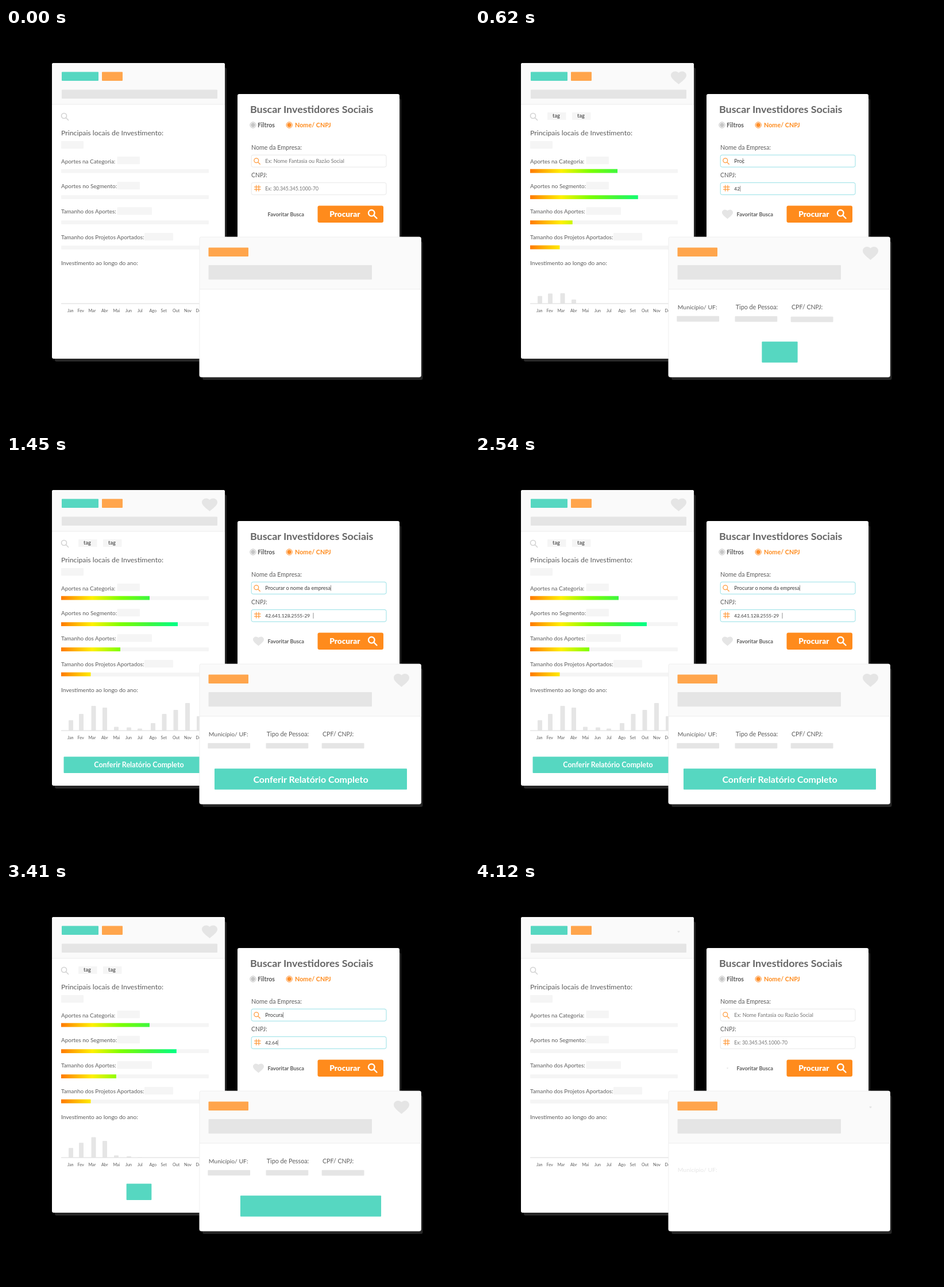
Write an HTML page that moves like this. It is 806 px wide and 695 px high and loops after 4160 ms.

```html
<!DOCTYPE html>
<html lang="pt">
<head>
<meta charset="utf-8">
<title>Busca</title>
<style>
html, body { margin: 0; width: 100%; height: 100%; overflow: hidden; background: #000; }
svg { display: block; width: 806px; height: 695px; }
text { font-family: Lato, "Open Sans", sans-serif; fill: #5c5c5c; white-space: pre; }
</style>
</head>
<body>
<svg id="stage" viewBox="0 0 806 695" xmlns="http://www.w3.org/2000/svg"></svg>
<script>
const LOOP = 4160;
const TEAL = '#56d7c1', ORANGE = '#ffa54c', DEEP = '#ff8b1c', GRAY = '#e5e5e5', PALE = '#f5f5f5';
const NAME = 'Procurar o nome da empresa', CODE = '42.641.128.2555-29';

// Markup helpers
const rect = (x, y, w, h, fill, extra = '') =>
  `<rect x="${x}" y="${y}" width="${w}" height="${h}" fill="${fill}" ${extra}/>`;
const text = (x, y, size, str, extra = '') =>
  `<text x="${x}" y="${y}" font-size="${size}" ${extra}>${str}</text>`;
const bold = (x, y, size, str, extra = '') => text(x, y, size, str, 'font-weight="700" ' + extra);
const group = (id, body) => `<g id="${id}">${body}</g>`;
const lens = (x, y, r, tail, color, w) =>
  `<g fill="none" stroke="${color}" stroke-width="${w}" stroke-linecap="round"><circle cx="${x}" cy="${y}" r="${r}"/>` +
  `<path d="M${x + r * .72} ${y + r * .72}l${tail} ${tail}"/></g>`;
const radio = (x, color) =>
  `<circle cx="${x}" cy="169" r="5.2" fill="none" stroke="${color}"/><circle cx="${x}" cy="169" r="3.7" fill="${color}"/>`;
const card = (x, y, w, h) =>
  rect(x + 5, y + 8, w - 2, h - 3, '#262626', 'rx="3"') + rect(x, y, w, h, '#fff', 'rx="3"');
const header = (x, y, w, h) =>
  `<path d="M${x} ${y + h}v${3 - h}q0-3 3-3h${w - 6}q3 0 3 3v${h - 3}z" fill="#fafafa"/>` +
  rect(x, y + h - .5, w, 1, '#eee');

const hearts = [[354.5, 86.7, 27, 22.5], [688.5, 392.5, 27, 23], [439.5, 324.5, 19, 16]];
const heart = (h, i) => `<path id="heart${i}" fill="${GRAY}" d="M0 9.175l-1.45-1.32C-6.6 3.185-10 .105-10-3.675` +
  `-10-6.755-7.58-9.175-4.5-9.175c1.74 0 3.41.81 4.5 2.09C1.09-8.365 2.76-9.175 4.5-9.175 7.58-9.175 10-6.755 10-3.675` +
  `c0 3.78-3.4 6.86-8.55 11.54z"/>`;

// Meters: y, fill width, start time
const meters = [[245.7, 154, 231], [291.3, 203, 350], [335.2, 103, 472], [378.6, 51.5, 112]];
const months = ['Jan', 'Fev', 'Mar', 'Abr', 'Mai', 'Jun', 'Jul', 'Ago', 'Set', 'Out', 'Nov', 'Dez'];
const monthX = [107, 124.5, 143.5, 166, 186.5, 208, 229, 249.5, 269.5, 290, 310, 330.5];
const barX = [113, 131, 152.5, 172, 192, 214, 233, 256, 275.5, 295.5, 316, 336];
const barH = [18, 29, 43, 40, 6.5, 5.5, 3.5, 13, 29, 36, 48, 25];

const report = card(80, 61, 301, 515) + header(80, 61, 301, 72) +
  rect(97, 76.5, 64, 15.5, TEAL, 'rx="1"') + rect(167, 76.5, 36, 15.5, ORANGE, 'rx="1"') +
  rect(97, 107.5, 271, 15.5, GRAY, 'rx="1"') + heart(0, 0) +
  lens(101, 153, 4.5, 4.3, '#d2d2d2', 1.6) +
  [126, 169].map((x, i) => group('tag' + i,
    rect(x, 147, 32.5, 13, PALE, 'rx="1"') + bold(x + 9, 156, 9.1, 'tag'))).join('') +
  text(96, 187, 12.3, 'Principais locais de Investimento:') +
  text(96, 235.5, 9.92, 'Aportes na Categoria:') +
  text(96, 278.5, 9.95, 'Aportes no Segmento:') +
  text(96, 322.5, 9.82, 'Tamanho dos Aportes:') +
  text(96, 367.5, 9.82, 'Tamanho dos Projetos Aportados:') +
  text(96, 413, 10.1, 'Investimento ao longo do ano:') +
  [[96, 197, 39], [193.5, 224, 39.5], [193.5, 268, 39.5], [193.5, 312.3, 60.5], [241, 357, 50]]
    .map(([x, y, w]) => rect(x, y, w, 13.3, PALE, 'rx="1"')).join('') +
  meters.map(([y], i) => rect(96, i === 3 ? 379 : y, 257, 6.8, PALE, 'rx="1"') +
    rect(96, y, 0, 6.8, 'url(#heat)', `id="meter${i}"`)).join('') +
  barX.map((x, i) => rect(x - 4, 480, 8, 0, GRAY, `id="bar${i}" rx="1"`)).join('') +
  rect(96, 479.4, 257, 1.3, '#e2e2e2') +
  months.map((m, i) => text(monthX[i], 495, 7.2, m)).join('') +
  rect(231.5, 525.5, 0, 28.5, TEAL, 'id="btn0" rx="1"') +
  bold(231.5, 544, 12.5, 'Conferir Relatório Completo', 'id="label0" text-anchor="middle" style="fill:#fff"');

const field = (i, y, hint, size) =>
  rect(427.2, y, 234.8, 21, '#fff', `id="field${i}" rx="3" stroke="#e8e8e8"`) +
  text(451.3, y + 14, size, hint, `id="hint${i}" style="fill:#757575"`) +
  text(451.3, y + 14, i ? 8.48 : 9.05, '', `id="typed${i}" style="fill:#3c3c3c"`) +
  rect(451, y + 5.5, .8, 10, '#777', `id="caret${i}"`);

const search = card(403, 115, 282, 300) +
  bold(425, 147.5, 17.9, 'Buscar Investidores Sociais', 'style="fill:#666"') +
  radio(430, '#c6c6c6') + bold(438, 172.8, 10.7, 'Filtros') +
  radio(493.2, '#ff8f2a') + bold(503, 172.8, 10.8, 'Nome/ CNPJ', 'style="fill:#ff8b1c"') +
  text(427, 211.5, 10.7, 'Nome da Empresa:') + text(427, 259.8, 10.5, 'CNPJ:') +
  field(0, 221.2, 'Ex: Nome Fantasia ou Razão Social', 9.09) +
  field(1, 269.4, 'Ex: 30.345.345.1000-70', 8.6) +
  lens(435.8, 230.8, 3.9, 3.6, '#ff9a3c', 1.3) +
  '<path d="M435.6 273.5v11M440 273.5v11M432 276.8h11.6M432 281.2h11.6" fill="none" stroke="#ff9a3c" stroke-width="1.2"/>' +
  heart(0, 2) + bold(455.5, 328, 9.3, 'Favoritar Busca') +
  rect(542.5, 309.5, 114.5, 29.5, DEEP, 'rx="3"') +
  text(563.3, 328.8, 13.55, 'Procurar', 'font-weight="900" style="fill:#fff"') +
  lens(636.3, 322.3, 5.3, 5.4, '#fff', 2.3);

// Items of the detail card, in order of appearance
const items = [
  text(352.8, 489.5, 10.4, 'Município/ UF:'),
  text(453.8, 489.5, 10.75, 'Tipo de Pessoa:'),
  text(551, 489.5, 10.6, 'CPF/ CNPJ:'),
  ...[351.3, 452.5, 549.7].map(x => rect(x, 501.7, 73.8, 9.6, GRAY, 'rx="1"'))
];
const detail = card(337, 364, 385.5, 244) + header(337, 364, 385.5, 91) +
  rect(336.8, 364, 385.7, 244, 'none', 'rx="3" stroke="#ececec" stroke-width=".8"') +
  rect(352.5, 382.5, 69.5, 15.5, ORANGE, 'rx="1"') + rect(352.5, 413, 284.5, 25.3, GRAY, 'rx="1"') +
  heart(0, 1) + items.map((m, i) => group('item' + i, m)).join('') +
  rect(530.5, 546.3, 0, 36.5, TEAL, 'id="btn1" rx="1"') +
  bold(530.5, 571, 16, 'Conferir Relatório Completo', 'id="label1" text-anchor="middle" style="fill:#fff"');

const stops = [[0, '#ff7a00'], [.09, '#ffae00'], [.21, '#fff000'], [.4, '#7dff00'], [.6, '#3cf740'], [.79, '#00ff88'], [1, '#00ffb0']];
const stage = document.getElementById('stage');
stage.innerHTML = '<defs><linearGradient id="heat" gradientUnits="userSpaceOnUse" x1="96" x2="353" y1="0" y2="0">' +
  stops.map(([o, c]) => `<stop offset="${o}" stop-color="${c}"/>`).join('') + '</linearGradient></defs>' +
  rect(0, 0, 806, 695, '#000') + report + search + detail;

const parts = {};
stage.querySelectorAll('[id]').forEach(el => parts[el.id] = el);
const set = (id, attrs) => { for (const k in attrs) parts[id].setAttribute(k, attrs[k]); };
const clamp = v => Math.max(0, Math.min(1, v));
const ease = (t, start) => 1 - (1 - clamp((t - start) / 670)) ** 5;
const rise = (id, k, dist) => set(id, { opacity: k, transform: `translate(0 ${dist * (1 - k)})` });
const mix = (a, b, k) => `rgb(${a.map((v, i) => Math.round(v + (b[i] - v) * k))})`;

function draw(t) {
  hearts.forEach(([x, y, w, h], i) => {
    const k = ease(t, 18);
    set('heart' + i, { transform: `translate(${x} ${y}) scale(${k * w / 20} ${k * h / 18.35})` });
  });
  for (let i = 0; i < 2; i++) rise('tag' + i, ease(t, 80 + 60 * i), 8);
  items.forEach((m, i) => rise('item' + i, ease(t, 17 + 61.6 * i), 18));
  meters.forEach(([y, w, start], i) => set('meter' + i, { width: w * ease(t, start) }));
  barH.forEach((full, i) => {
    const h = full * ease(t, 466 + 42 * i + .4 * i * i);
    set('bar' + i, { y: 480 - h, height: h });
  });
  [[231.5, 262, 725], [530.5, 335, 594]].forEach(([mid, full, start], i) => {
    const w = full * ease(t, start);
    set('btn' + i, { x: mid - w / 2, width: w });
    rise('label' + i, ease(t, start + 170), 5);
  });
  const focus = clamp((t - 380) / 100);
  [[NAME, 477, .028, 114, 900], [CODE, 505, .0207, 83.5, 935]].forEach(([str, start, rate, dist, dur], i) => {
    const count = Math.floor(Math.max(0, t - start) * rate);
    parts['typed' + i].textContent = str.slice(0, count);
    set('hint' + i, { opacity: 1 - focus });
    set('field' + i, { stroke: mix([232, 232, 232], [150, 224, 230], focus) });
    set('caret' + i, { x: 451.1 + dist * clamp((t - 505) / dur), opacity: focus });
  });
}

// Plays forward, holds, then runs back
function frame() {
  const t = performance.now() % LOOP;
  draw(Math.min(t, LOOP - t));
  requestAnimationFrame(frame);
}
draw(0);
requestAnimationFrame(frame);
</script>
</body>
</html>
```
